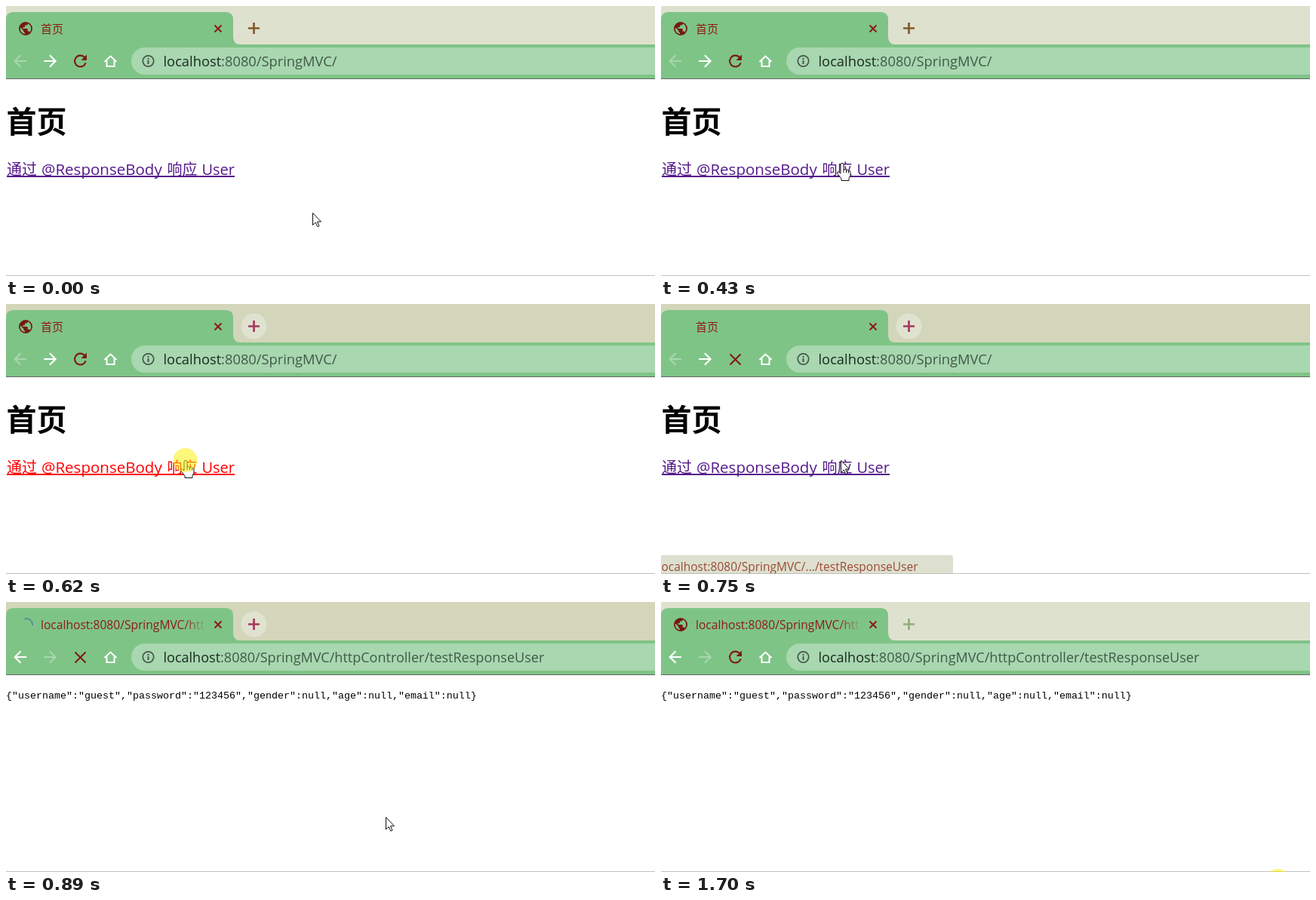
Recreate the animation shown at these times as an HTML page. Size 860 by 358 pixels, loop 1770 ms.

```html
<!DOCTYPE html>
<html lang="zh">
<head>
<meta charset="utf-8">
<title>首页</title>
<style>
html, body { margin: 0; width: 100%; height: 100%; overflow: hidden; background: #fff; }
svg { display: block; width: 860px; height: 358px; }
text { font-family: "Open Sans", "Noto Sans", sans-serif; white-space: pre; }
.cjk { font-family: "Noto Sans CJK SC", "Noto Sans CJK", sans-serif; }
.mono { font: 13.33px "Liberation Mono", monospace; }
.line { fill: none; stroke-width: 2; }
.thin { stroke-width: 1.7; }
.thick { stroke-width: 2.7; }
</style>
</head>
<body>
<svg viewBox="0 0 860 358">
  <defs>
    <linearGradient id="fade" gradientUnits="userSpaceOnUse" x1="236" x2="266">
      <stop stop-color="#8c1c12"/>
      <stop offset="1" stop-color="#8c1c12" stop-opacity="0"/>
    </linearGradient>
    <path id="back" d="M20 11H7.8l5.6-5.6L12 4l-8 8 8 8 1.4-1.4L7.8 13H20z"/>
  </defs>

  <rect id="strip" width="860" height="52"/>
  <path fill="#7fc487" d="M0 18Q0 8 10 8H291Q301 8 301 18V41Q301 51 311 51H860V96H0Z"/>
  <rect y="96" width="860" height="1" fill="#626a64"/>
  <rect x="166" y="55" width="740" height="36" rx="18" fill="#a8d7b0"/>

  <g id="globe" transform="translate(15.2 19.2) scale(.9)" fill="#741a12">
    <path d="M12 2a10 10 0 1 0 0 20 10 10 0 0 0 0-20zm-1 17.9c-4-.5-7-3.8-7-7.9 0-.6.1-1.2.2-1.8L9 15v1c0 1.1.9 2 2 2zm6.9-2.5c-.3-.8-1-1.4-1.9-1.4h-1v-3c0-.6-.4-1-1-1H8v-2h2c.6 0 1-.4 1-1V7h2c1.1 0 2-.9 2-2v-.4c2.9 1.2 5 4 5 7.4 0 2.1-.8 4-2.1 5.4z"/>
  </g>
  <path id="spinner" class="line"/>
  <text id="home" class="cjk" x="46" y="36" font-size="15" fill="#8c1c12">首页</text>
  <text id="title" x="46" y="36" font-size="15.6" fill="url(#fade)">localhost:8080/SpringMVC/htt</text>
  <path class="line" stroke="#8c1c12" d="M276.5 25.5l9 9m0-9l-9 9"/>
  <circle id="halo" cx="328.5" cy="29.5" r="17" fill="#e0e2d0"/>
  <path id="plus" class="line thick" d="M321 29.5h15M328.5 22v15"/>

  <use id="prev" href="#back" transform="translate(6 60.3) scale(1.06)"/>
  <use id="next" href="#back" transform="translate(71.4 60.3) scale(-1.06 1.06)"/>
  <path id="reload" fill="#7d1a10" transform="translate(85.8 60.3) scale(1.06)" d="M17.65 6.35A8 8 0 1 0 19.73 14h-2.08A6 6 0 1 1 16.22 7.78L13 11h7V4z"/>
  <path id="stop" class="line" stroke="#7d1a10" d="M91.5 66.500l14 14m0-14l-14 14"/>
  <path class="line" stroke="#fff" d="M130.5 74l8-7.500 8 7.500M133.5 72v8h10v-8"/>
  <g fill="#46574b">
    <circle class="line thin" cx="188.500" cy="73" r="7.200" stroke="#46574b"/>
    <path d="M187.500 72h2v5h-2zM187.500 69h2v2h-2z"/>
  </g>
  <text id="url" x="208.500" y="80" fill="#415a49"><tspan fill="#1b2a1f">localhost</tspan><tspan id="path"></tspan></text>

  <g id="index">
    <text class="cjk" x="0.500" y="167.500" font-size="40" font-weight="700">首页</text>
    <g id="link">
      <text class="cjk" x="1" y="223.500" font-size="20">通过</text>
      <text x="47" y="224" font-size="20.500">@ResponseBody</text>
      <text class="cjk" x="213.500" y="223.500" font-size="20">响应</text>
      <text x="259.500" y="224" font-size="20">User</text>
      <rect x="1" y="225" width="302" height="2"/>
    </g>
  </g>
  <text id="json" class="mono" x="0" y="127.500">{"username":"guest","password":"123456","gender":null,"age":null,"email":null}</text>

  <g id="status">
    <path fill="#dee0cf" d="M0 333H383Q387 333 387 337V358H0Z"/>
    <text x="340.500" y="354" font-size="15.500" text-anchor="end" fill="#9c4a36">localhost:8080/SpringMVC/.../testResponseUser</text>
  </g>
  <rect y="357" width="860" height="1" fill="#bfc1bf"/>

  <g id="pointer" fill="#fff" stroke="#111" stroke-linejoin="round">
    <path id="arrow" d="M.5 .5V16.500L4.200 13 6.800 18.700 9 17.700 6.500 12H11.500Z"/>
    <path id="hand" d="M-2 1.500Q0-1.200 2 1.500V9Q4.500 7.800 5.500 9.700 7.800 8.800 8.600 10.600 11 10 11 12.500V17L9 20.500V23.500H-1V21L-6.500 14Q-7 11.500-4.500 12L-2 14ZM2 9v4M5.500 9.700v3.500M8.600 10.600v3"/>
  </g>
  <circle id="click" r="16" fill="#fcf000" fill-opacity=".52"/>
</svg>
<script>
const LOOP = 1770;
// time, pointer x, pointer y
const STEPS = [
  [0, 406, 274], [70, 392, 269], [140, 346, 250], [220, 290, 227],
  [290, 257, 214], [360, 245, 210], [430, 240, 208], [490, 238, 207],
  [550, 238, 207], [620, 238, 207], [690, 238, 207], [750, 238, 207],
  [820, 285, 236], [890, 503, 285], [960, 655, 325], [1030, 770, 350],
  [1100, 818, 370], [1170, 818, 370], [1700, 818, 370]
];
const $ = id => document.getElementById(id);
const set = (id, name, value) => $(id).setAttribute(name, value);
const show = (id, on) => set(id, 'visibility', on ? 'visible' : 'hidden');
const fill = (id, color) => set(id, 'fill', color);

function arc(cx, cy, r, from, to) {
  const at = a => `${cx + r * Math.cos(a)} ${cy + r * Math.sin(a)}`;
  return `M${at(from)}A${r} ${r} 0 0 1 ${at(to)}`;
}

function draw([t, x, y]) {
  const active = t >= 620 && t < 1700;
  const loading = t >= 690 && t < 1170;
  const loaded = t >= 820;
  const pressed = t >= 550 && t < 690;

  fill('strip', active ? '#d3d6ba' : '#dfe1cf');
  show('halo', active);
  set('plus', 'stroke', active ? '#a8385f' : t >= 1700 ? '#93ac7d' : '#82592f');

  show('globe', !loading);
  show('spinner', loading);
  show('reload', !loading);
  show('stop', loading);
  const turn = (t - 890) / 1000 * Math.PI * 2;
  set('spinner', 'stroke', loaded ? '#5c8d98' : '#83a08a');
  set('spinner', 'd', loaded
    ? arc(27, 30, 8, turn - 1.9, turn + .1)
    : arc(26, 30, 8.5, -1.75, -1.55));

  show('home', !loaded);
  show('title', loaded);
  fill('prev', loaded ? '#fff' : '#a9d6ae');
  fill('next', loaded ? '#a9d6ae' : '#fff');
  $('path').textContent = ':8080/SpringMVC/' + (loaded ? 'httpController/testResponseUser' : '');
  set('url', 'font-size', loaded ? 18.05 : 18.3);

  show('index', !loaded);
  show('json', loaded);
  show('status', loading && !loaded);
  fill('link', pressed ? '#f00' : '#551a8b');

  const hand = t >= 220 && t < 750;
  show('arrow', !hand);
  show('hand', hand);
  set('pointer', 'transform', `translate(${x} ${y})`);
  show('click', pressed || t >= 1700);
  set('click', 'transform', `translate(${x - .5} ${y})`);
}

const start = performance.now();
let last;
function tick() {
  const t = (performance.now() - start) % LOOP;
  const step = STEPS.findLast(s => s[0] <= t);
  if (step !== last) draw(last = step);
  requestAnimationFrame(tick);
}
tick();
</script>
</body>
</html>
```
